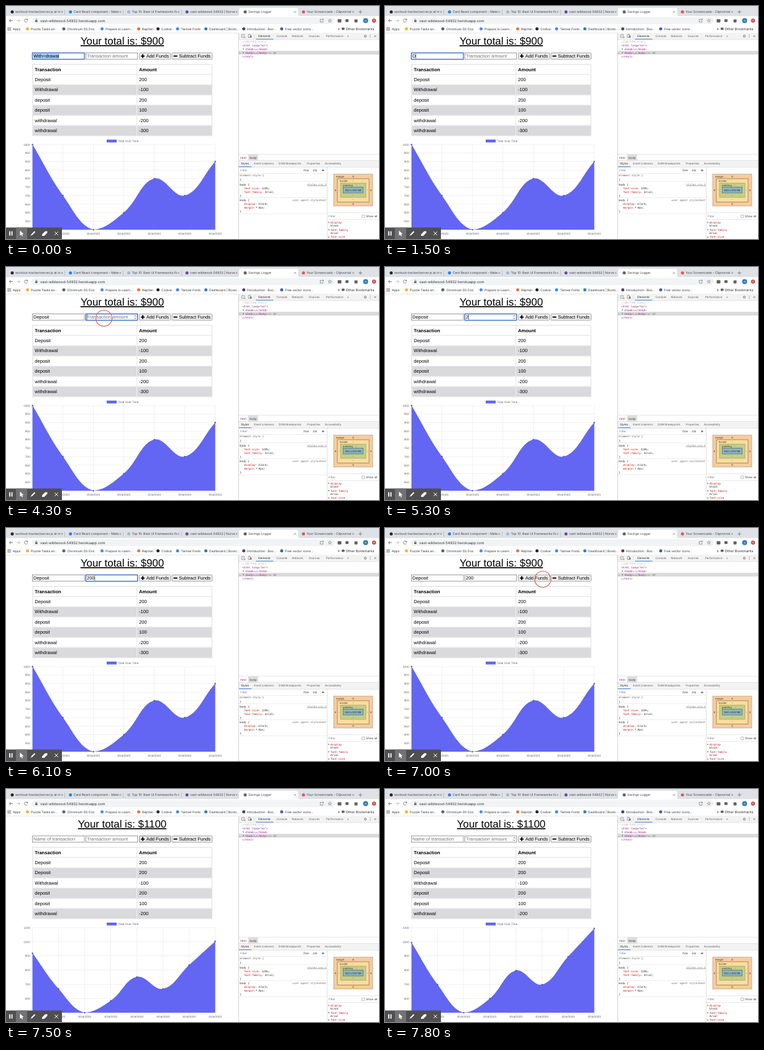
An HTML page that plays this animation: 600 by 375 pixels, repeating every 8000 ms.

```html
<!DOCTYPE html>
<html lang="en">
<head>
<meta charset="utf-8">
<title>Savings Logger</title>
<style>
html, body { margin: 0; width: 100%; height: 100%; overflow: hidden; background: #fff; }
svg { display: block; width: 100vw; height: 100vh; text-rendering: geometricPrecision; }
text { white-space: pre; }
.ui { font-family: Inter, Roboto, sans-serif; }
.page { font-family: "Liberation Sans", Arial, sans-serif; }
.code { font-family: "DejaVu Sans Mono", monospace; }
</style>
</head>
<body>
<svg viewBox="0 0 600 375" preserveAspectRatio="none">
  <g id="chrome"></g>
  <g id="live"></g>
  <g id="recorder"></g>
</svg>
<script>
const LOOP = 8000, STEP = 100;
const $ = id => document.getElementById(id);
const esc = s => s.replace(/&/g, '&amp;').replace(/</g, '&lt;');

// y is the vertical middle of the line
const text = (cls, x, y, s, size, fill = '#333', more = '') =>
  `<text class="${cls}" x="${x}" y="${y + size * 0.36}" font-size="${size}" fill="${fill}" ${more}>${esc(s)}</text>`;
const ui = (...a) => text('ui', ...a);
const page = (...a) => text('page', ...a);
const code = (x, y, s, fill = '#222', more = '') => text('code', x, y, s, 4.3, fill, more);
const box = (x, y, w, h, fill, more = '') =>
  `<rect x="${x}" y="${y}" width="${w}" height="${h}" fill="${fill}" ${more}/>`;
const dot = (x, y, r, fill, more = '') => `<circle cx="${x}" cy="${y}" r="${r}" fill="${fill}" ${more}/>`;
const line = (d, stroke = '#5f6368', w = 0.8, fill = 'none') =>
  `<path d="${d}" stroke="${stroke}" stroke-width="${w}" fill="${fill}"/>`;
const cross = (x, y, r, c, w) => line(`M${x - r} ${y - r}l${2 * r} ${2 * r}m0 ${-2 * r}l${-2 * r} ${2 * r}`, c, w);
const arrow = (x, y, c = '#6e6e6e') => `<path d="M${x} ${y - 1.3}l2 1.3l-2 1.3z" fill="${c}"/>`;
const raise = (dy, s) => `<g transform="translate(0 ${-dy})">${s}</g>`;

function browser() {
  const tabs = [
    ['workout-tracker/server.js at m', '#24292e'],
    ['Card React component - Mate', '#2684e0'],
    ['Top 10: Best UI Frameworks for', '#9fb7d8'],
    ['vast-wildwood-54932 | Norvek', '#6a4a9c'],
    ['Savings Logger', '#5f6368'],
    ['Your Screencasts - Clipvornal', '#e8554d']
  ];
  let s = box(0, 0, 600, 16.5, '#dee1e6') + '<path d="M372 16.5q3 0 3-3V6q0-3 3-3H467q3 0 3 3v7.500q0 3 3 3z" fill="#fff"/>';
  tabs.forEach(([name, c], i) => {
    const x = 1.5 + i * 93.7, tx = x + 13.5;
    s += dot(x + 8.5, 9.5, 2.5, c) +
      `<clipPath id="tab${i}"><rect x="${tx}" y="3" width="${x + 86 - tx}" height="13"/></clipPath>` +
      ui(tx, 9.5, name, 5.1, '#3c4043', `clip-path="url(#tab${i})"`) + cross(x + 88.5, 9.5, 1.4, '#5f6368', 0.6);
    if (i < 3) s += box(x + 93, 6, 0.5, 8, '#9a9da2');
  });
  s += line('M570 6.500v6m-3-3h6', '#5f6368', 0.7);

  s += box(0, 16.5, 600, 27, '#fff') + box(41, 18, 488, 11, '#f1f3f4', 'rx="5.5"') +
    line('M11 23.500H5.500m2.500-2.500l-2.500 2.500l2.500 2.500') +
    line('M17 23.500h5.500m-2.500-2.500l2.500 2.500l-2.500 2.500', '#b4b7bb') +
    line('M34.300 22a2.600 2.600 0 1 0 .2 2.500M34.800 20.500v2h-2') +
    box(47, 23, 3.6, 2.8, '#5f6368') + line('M47.800 23v-1a1 1 0 0 1 2 0v1', '#5f6368', 0.6) +
    ui(55, 23.5, 'vast-wildwood-54932.herokuapp.com', 5.75, '#303236') +
    line('M508 21.500h-2.500v4.500h4.500v-2M508 23.500l2.500-2.500m-2 0h2v2', '#5f6368', 0.6) +
    line('M521 20.700l.8 1.900l2 .1l-1.600 1.300l.6 2l-1.800-1.100l-1.800 1.100l.6-2l-1.600-1.300l2-.1z', '#5f6368', 0.5) +
    box(546, 21.3, 5, 4.5, '#5f6368', 'rx="1"') + box(560.5, 21.5, 5, 5, '#5f6368', 'rx="1"') +
    dot(578.5, 23.5, 4, '#2b7cb8') + ui(577.2, 23.5, 'N', 3.8, '#fff') +
    dot(592, 23.5, 3.2, '#d5443a') + line('M592 25.200v-3m-1.200 1.200l1.200-1.200l1.200 1.200', '#fff', 0.6);

  const marks = [
    [11, 'Apps', ''], [40, 'Puzzle Tasks an…', '#f2b632'], [98.5, 'Chromium OS Doc', '#5f6368'],
    [160, 'Prepare to Learn...', '#4c8bf5'], [219, 'RepVan', '#e8743b'], [250, 'Codval', '#24292e'],
    [281.5, 'Tamvel Fonts', '#4285f4'], [327, 'Dashboard | Bootc…', '#2f7dc0'],
    [388, 'Introduction · Boo…', '#563d7c'], [449, 'Free vector icons…', '#3a63b8']
  ];
  marks.forEach(([x, name, c]) => {
    s += ui(x, 36.7, name, 5.05, '#303236');
    s += c ? dot(x - 5.5, 36.7, 2.5, c) : '';
  });
  for (let i = 0; i < 9; i++)
    s += box(2.5 + i % 3 * 2, 34.2 + (i / 3 | 0) * 2, 1.4, 1.4, ['#ea4335', '#34a853', '#4285f4'][i % 3]);
  s += ui(533.5, 36.4, '»', 6) + box(540, 34.8, 4.6, 3.6, '#5f6368', 'rx=".6"') +
    ui(546.5, 36.7, 'Other Bookmarks', 5.6, '#303236');
  return s + box(0, 43, 600, 0.6, '#d2d4d7');
}

function devtools() {
  let s = box(374, 43.5, 226, 331.5, '#fff') + box(374, 43.5, 226, 10.5, '#f3f3f3') +
    line('M382 50.500h-3v-4.500h4.500v2M381.500 48l3 3m0-2v2h-2', '#6e6e6e', 0.6) +
    box(390, 45.7, 3, 5, 'none', 'stroke="#6e6e6e" stroke-width=".6"') + box(393, 47.5, 2, 3.4, '#6e6e6e') +
    box(399.5, 45, 0.5, 7, '#ccc');
  [[406, 'Elements'], [435, 'Console'], [460, 'Network'], [487, 'Sources'], [515, 'Performance'], [549, '»']]
    .forEach(([x, n], i) => s += ui(x, 48.5, n, 4.5, i ? '#5a5a5a' : '#222'));
  s += box(402, 52.8, 28, 1, '#1a73e8') + box(374, 53.8, 226, 0.5, '#ccc') +
    dot(578, 48.5, 1.6, 'none', 'stroke="#6e6e6e" stroke-width="1"') +
    [46.5, 48.5, 50.5].map(y => dot(586, y, 0.55, '#6e6e6e')).join('') + cross(594, 48.5, 1.5, '#6e6e6e', 0.7);

  const tag = '#8a1a80';
  s += code(380, 57.7, '<!DOCTYPE html>', '#b5b5b5') +
    code(380, 63.5, '<html lang="en">', tag) +
    arrow(381, 69.3) + code(384.5, 69.3, '<head>…</head>', tag) +
    box(374, 72.2, 226, 6, '#dadada') + code(375, 75, '…', '#777') + arrow(381, 75.2) +
    code(384.5, 75.2, '<body>…</body>', tag) + code(422, 75.2, '== $0', '#777', 'font-style="italic"') +
    code(380, 81, '</html>', tag);

  s += box(374, 238.5, 226, 10.5, '#fff') + box(374, 238.3, 226, 0.5, '#ccc') + box(389.5, 239, 16, 9.5, '#dedede') +
    ui(377, 244, 'html', 4.7, tag) + ui(392, 244, 'body', 4.7, '#333') +
    box(374, 248.7, 226, 10.5, '#f3f3f3') + box(374, 248.5, 226, 0.5, '#ccc');
  [[378, 'Styles'], [399, 'Event Listeners'], [438.5, 'DOM Breakpoints'], [484, 'Properties'], [513, 'Accessibility']]
    .forEach(([x, n], i) => s += ui(x, 253.7, n, 4.4, i ? '#5a5a5a' : '#222'));
  s += box(375, 258.3, 20, 1, '#1a73e8') + box(374, 259, 226, 0.5, '#ccc') +
    ui(377, 264.5, 'Filter', 4.6, '#777') + ui(478, 264.5, ':hov', 4.7, '#222') + ui(492.5, 264.5, '.cls', 4.7, '#222') +
    line('M510 262.500v4m-2-2h4', '#333', 0.7) + box(374, 269, 143, 0.5, '#ddd');

  const rule = (y, rows) => rows.forEach(([k, v], i) => {
    s += code(383, y + i * 6, k + ':', '#c80000') + code(383 + (k.length + 2) * 2.59, y + i * 6, v);
  });
  s += code(376, 272.8, 'element.style {', '#555') + code(376, 279, '}') + box(374, 282.6, 143, 0.5, '#ddd') +
    code(376, 287, 'body {') + code(484.5, 287, 'styles.css:1', '#666', 'text-decoration="underline"');
  rule(293, [['font-size', '120%;'], ['font-family', 'Arial;']]);
  s += code(376, 305, '}') + box(374, 308.4, 143, 0.5, '#ddd');
  s += '<g font-style="italic">' + code(376, 312, 'body {') + code(461, 312, 'user agent stylesheet', '#666');
  rule(318, [['display', 'block;'], ['margin', ' 8px;']]);
  s += arrow(402.5, 324) + '</g>' + code(376, 330, '}') + box(374, 334, 143, 0.5, '#ddd');

  const rim = 'stroke="#444" stroke-width=".5"', mid = 'text-anchor="middle"';
  s += box(516.5, 259, 0.6, 116, '#ccc') +
    box(527, 270.5, 63, 51.5, '#f8cb9c', rim + ' stroke-dasharray="1 .8"') +
    box(533, 278, 51, 37.5, '#fddd9b', rim) + box(538, 285, 41, 23, '#c2cf8a', rim + ' stroke-dasharray="1 .8"') +
    box(542.5, 291.5, 32, 9.5, '#8bb4bf', rim) +
    ui(531, 274.2, 'margin', 4.1, '#333') + ui(537, 281.6, 'border', 4.1, '#333') + ui(542, 288.4, 'padding', 4.1, '#333') +
    ui(558.5, 296.3, '942 x 833.188', 3.9, '#222', mid);
  [[558.5, 274.2, '8'], [558.5, 318.5, '8'], [530, 296.3, '8'], [587, 296.3, '8'], [558.5, 281.6, '-'],
    [558.5, 311.8, '-'], [535.6, 296.3, '-'], [581.4, 296.3, '-'], [564, 288.4, '-'], [558.5, 304.5, '-']]
    .forEach(([x, y, n]) => s += ui(x, y, n, 4, '#333', mid));
  s += box(517, 332.6, 83, 0.5, '#ccc') + ui(519, 338.5, 'Filter', 4.6, '#777') +
    box(572.5, 336.2, 4.4, 4.4, '#fff', 'rx=".8" stroke="#777" stroke-width=".5"') + ui(579, 338.5, 'Show all', 4.6, '#333') +
    box(517, 343.6, 83, 0.5, '#ccc');
  [['display', 'block'], ['font-family', 'Arial'], ['font-size', '']].forEach(([k, v], i) => {
    const y = 348.3 + i * 11.8;
    s += arrow(518.5, y) + code(522, y, k, '#c80000') + code(522, y + 5.5, v);
  });
  return s + box(373.8, 43.5, 0.7, 331.5, '#bbb');
}

function recorder() {
  return box(0, 356.5, 90, 18.5, '#4f4f51') + box(16, 356.5, 18, 18.5, '#727274') +
    box(5.2, 362.5, 1.8, 7, '#fff') + box(8.7, 362.5, 1.8, 7, '#fff') +
    '<path d="M22.500 361.500v8l2-1.600l1.300 2.800l1.300-.6l-1.300-2.700l2.500-.3z" fill="#fff"/>' +
    line('M41 368.500l5.500-5.500', '#fff', 2) + line('M39.500 370l1.500-1.500', '#fff', 0.9) +
    '<path d="M58 367.500l5-5h3.500v2.500l-5 5h-3.500z" fill="#fff"/>' + cross(81, 366, 2.8, '#fff', 1);
}

const PEN = new OffscreenCanvas(1, 1).getContext('2d');
PEN.font = '75px "Liberation Sans", Arial, sans-serif';
const widthOf = s => PEN.measureText(s).width / 10;

// [time, field, value]
const EDITS = [
  [0, 'name', 'With=drawal'], [600, 'name', ''], [1500, 'name', 'D'], [1800, 'name', 'De'], [1900, 'name', 'Dep'],
  [2100, 'name', 'Depo'], [2200, 'name', 'Depos'], [2400, 'name', 'Deposi'], [2700, 'name', 'Deposit'],
  [4200, 'amount', ''], [5200, 'amount', '2'], [5500, 'amount', '20'], [5700, 'amount', '200'],
  [7200, 'name', ''], [7200, 'amount', '']
];
// [time, x, y, radius, opacity]
const RINGS = [
  [4200, 157.5, 82.5, 8, 0.7], [4300, 157.5, 82.5, 13, 1], [4400, 0, 0, 0, 0],
  [6900, 253.8, 82.5, 8, 0.7], [7000, 253.8, 82.5, 13, 1], [7200, 253.8, 83.5, 3, 0.5], [7300, 0, 0, 0, 0]
];
const ROWS = [['Deposit', 200], ['Withdrawal', -100], ['deposit', 200], ['deposit', 100], ['withdrawal', -200], ['withdrawal', -300]];
const SUMS = [1000, 700, 500, 600, 800, 700, 900];

function field(x, w, value, hint, focus, selected, blink) {
  let s = box(x + 0.4, 75.9, w - 0.8, 10.2, '#fff', focus ? 'stroke="#2a66c8" stroke-width="1.3"' : 'stroke="#858585" stroke-width=".8"');
  const tx = x + 2;
  if (selected) s += box(tx, 76.8, widthOf(value), 8.4, '#a9cdf8');
  s += page(tx, 81, value || hint, 7.5, value ? '#000' : '#757575');
  if (focus && blink && !selected) s += box(tx + widthOf(value) + 0.1, 76.9, 0.6, 8.2, '#111');
  return s;
}

function button(x, w, label, plus, active) {
  return box(x + 0.4, 75.9, w - 0.8, 10.2, active ? '#e4e4e4' : '#efefef', `rx="1" stroke="${active ? '#555' : '#858585'}" stroke-width=".7"`) +
    line(`M${x + 3} 81h6` + (plus ? 'm-3-3v6' : ''), '#000', 1.9) + page(x + 11.7, 81, label, 7.5, '#000');
}

function form(t) {
  const val = {};
  let last = 0;
  for (const [at, k, v] of EDITS) if (at <= t) { val[k] = v; last = at; }
  const blink = (t - last) % 1000 < 500;
  let s = field(42, 84.5, val.name, 'Name of transaction', t < 4200, t < 600, blink) +
    field(128, 84, val.amount || '', 'Transaction amount', t >= 4200 && t < 6900, false, blink);
  if (t >= 4000 && t < 6100 || t >= 7600)
    s += line('M206.300 80l1.500-1.800l1.500 1.800M206.300 82l1.500 1.800l1.500-1.800', '#555', 0.8);
  return s + button(214, 51, 'Add Funds', true, t >= 7200 && t < 7600) +
    button(266.5, 65.5, 'Subtract Funds', false, false);
}

function table(rows) {
  let s = box(42.6, 94.2, 289, 115.2, '#fff', 'stroke="#dcdcde" stroke-width=".6"');
  [['Transaction', 'Amount'], ...rows].slice(0, 7).forEach((r, i) => {
    const y = 94.8 + i * 16.4, fill = i && i % 2 == 0 ? '#dad9dc' : '#fff';
    const more = i ? '' : 'font-weight="bold"', rim = 'stroke="#dcdcde" stroke-width=".5"';
    s += box(43.3, y, 166.7, 15.5, fill, rim) + box(211, y, 120, 15.5, fill, rim) +
      page(46.3, y + 7.5, r[0], 7.55, '#000', more) + page(214, y + 7.5, String(r[1]), 7.55, '#000', more);
  });
  return s;
}

const TOP = 223, BASE = 360, LEFT = 42.6, WIDE = 294;

function curve(p) {
  const tension = 0.4, keep = y => Math.min(BASE, Math.max(TOP, y));
  const handles = p.map((c, i) => {
    const a = p[i - 1] || c, b = p[i + 1] || c;
    const da = Math.hypot(c[0] - a[0], c[1] - a[1]), db = Math.hypot(b[0] - c[0], b[1] - c[1]);
    const move = k => [c[0] + k * (b[0] - a[0]), keep(c[1] + k * (b[1] - a[1]))];
    return [move(-tension * da / (da + db)), move(tension * db / (da + db))];
  });
  return p.slice(1).map((q, i) => ['C', handles[i][1], handles[i + 1][0], q]);
}

function chart(sums, max, step, grow) {
  const n = sums.length, gap = WIDE / (n - 1);
  const lift = y => (BASE - (BASE - y) * grow).toFixed(2);
  const pts = sums.map((v, i) => [LEFT + i * gap, BASE - (v - 500) / (max - 500) * (BASE - TOP)]);
  let s = box(162, 215, 16, 4.6, '#6266f3') + page(180.5, 217.2, 'Total Over Time', 4.7, '#666');
  for (let v = 500; v <= max; v += step) {
    const y = BASE - (v - 500) / (max - 500) * (BASE - TOP);
    s += box(LEFT - 4, y - 0.2, WIDE + 4, 0.5, '#e3e3e3') +
      page(LEFT - 4, y, String(v), 4.7, '#666', 'text-anchor="end"');
  }
  pts.forEach(([x]) => {
    s += box(x - 0.2, TOP, 0.5, BASE - TOP + 4, '#e3e3e3') +
      page(x, 366.3, '8/16/2020', 4.7, '#666', 'text-anchor="middle"');
  });
  const at = q => q[0].toFixed(2) + ' ' + lift(q[1]);
  const path = 'M' + at(pts[0]) + curve(pts).map(([c, ...q]) => c + q.map(at).join(' ')).join('');
  s += `<path d="${path}V${BASE}H${LEFT}z" fill="#6266f3"/>` + line(path, 'rgba(0,0,0,.1)', 1.2);
  return s + pts.map(q => dot(q[0], lift(q[1]), 1.1, '#5659cf', 'stroke="#4b4ea8" stroke-width=".3"')).join('');
}

function scene(t) {
  const done = t >= 7200;
  const p = Math.min(1, Math.max(0, (t - 7134) / 1000));
  let s = page(187, 56, 'Your total is: $' + (done ? 1100 : 900), 16.85, '#000', 'text-anchor="middle" text-decoration="underline"');
  s += raise(0.4, form(t) + table(done ? [ROWS[0], ...ROWS] : ROWS));
  s += done ? chart([...SUMS, 1100], 1100, 100, 1 - (1 - p) ** 4) : chart(SUMS, 1000, 50, 1);
  s += box(533.5, 21.2, 6, 5.4, '#6b5a5a', `rx="1" opacity="${t >= 200 && t < 300 ? 0.6 : 1}"`);
  const ring = RINGS.filter(r => r[0] <= t).pop();
  if (ring && ring[4])
    s += dot(ring[1], ring[2], ring[3], 'none', `stroke="#dc6258" stroke-width="1.2" opacity="${ring[4]}"`);
  return s;
}

$('chrome').innerHTML = browser() + devtools();
$('recorder').innerHTML = recorder();

let shown = -1;
const start = performance.now();
function tick() {
  const t = Math.floor((performance.now() - start) % LOOP / STEP) * STEP;
  if (t !== shown) $('live').innerHTML = scene(shown = t);
  requestAnimationFrame(tick);
}
tick();
</script>
</body>
</html>
```
